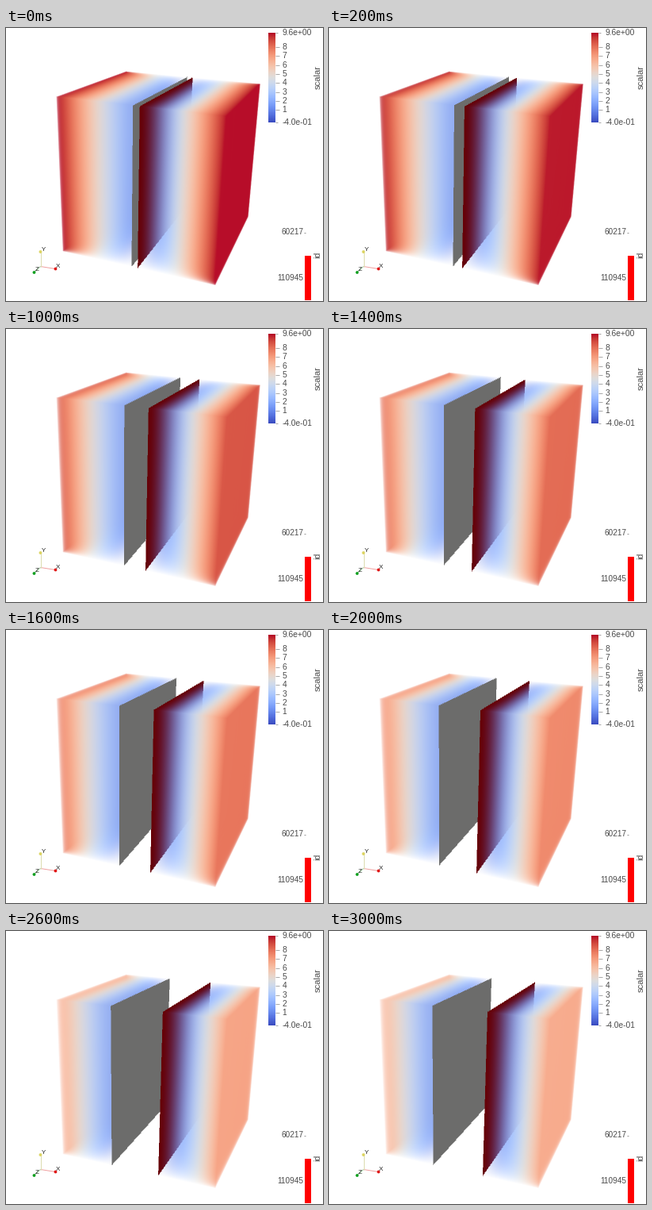
Animation of 400 by 344 pixels, one loop 3200 ms. Source, as a matplotlib script:

```python
import numpy as np
import matplotlib.pyplot as plt
from matplotlib.animation import FuncAnimation

W, H, DPI = 400, 344, 100
FRAMES, INTERVAL = 16, 200
STEPS = 36          # samples along each ray
LUT = 8192          # resolution of the lookup tables across the cube
UNIT = 0.068        # opacity unit distance
MID = 0.497         # where the cube is split
GREY, MAROON = (0.425, 0.425, 0.42), (0.4, 0.0, 0.02)
INK = "#4a4a4a"
CMAP = plt.get_cmap("coolwarm")

# cube corners: u right, v up, w away from the viewer -> screen x, y
CORNERS = [
    (0, 1, 0, 63, 86), (1, 1, 0, 278, 110.5), (1, 0, 0, 264, 324),
    (0, 0, 0, 71, 281), (0, 1, 1, 151, 54), (1, 1, 1, 321, 70),
    (1, 0, 1, 305, 237), (0, 0, 1, 150.5, 210),
]


def fit_camera():
    """Least-squares projection matrix through the cube corners."""
    rows, rhs = [], []
    for u, v, w, x, y in CORNERS:
        rows.append([u, v, w, 1, 0, 0, 0, 0, -x * u, -x * v, -x * w])
        rows.append([0, 0, 0, 0, u, v, w, 1, -y * u, -y * v, -y * w])
        rhs += [x, y]
    p = np.linalg.lstsq(np.array(rows, float), np.array(rhs, float), rcond=None)[0]
    p = np.append(p, 1).reshape(3, 4)
    inv = np.linalg.inv(p[:, :3])
    return inv, -inv @ p[:, 3]


def cast_rays(shift):
    """Where each pixel's ray enters and leaves the cube, and its speed in u."""
    inv, eye = fit_camera()
    y, x = np.mgrid[0:H, 0:W] + shift
    d = np.stack([x, y, np.ones_like(x)], -1).reshape(-1, 3) @ inv.T
    near, far = -eye / d, (1 - eye) / d
    t0 = np.minimum(near, far).max(1)
    t1 = np.maximum(near, far).min(1)
    hit = np.flatnonzero(t1 > t0)
    d, t0, t1 = d[hit], t0[hit], t1[hit]
    speed = np.abs(d[:, 0]) / np.linalg.norm(d, axis=1)
    u_in = np.clip(eye[0] + t0 * d[:, 0], 0, 1)
    u_out = np.clip(eye[0] + t1 * d[:, 0], 0, 1)
    return hit, u_in, u_out, speed


def half_gap(i):
    return min(0.02 + 0.0102 * i, 0.162)


def trace(rays, h):
    hit, u_in, u_out, speed = rays
    u = np.linspace(0, 1, LUT + 1)
    s = 20 * (np.abs(u - MID) - h)
    level = np.clip((s + 0.4) / 10, 0, 0.99)
    density = np.where(s >= 0, -np.log1p(-level), 0) / UNIT
    depth = np.cumsum(density) / LUT
    rgb = CMAP(level)[:, :3]

    left, right = MID - h, MID + h
    on_red = (u_in > right) & (u_out < right)
    on_grey = (u_in <= right) & (u_in > left) & (u_out < left)
    stop = np.where(on_red, right, np.where(on_grey, left, u_out))
    base = np.ones((len(hit), 3))
    base[on_red], base[on_grey] = MAROON, GREY

    prev = np.rint(u_in * LUT).astype(int)
    start, span = depth[prev], stop - u_in
    light = np.ones(len(hit))
    color = np.zeros_like(base)
    for k in range(1, STEPS + 1):
        cur = np.rint((u_in + span * (k / STEPS) ** 2) * LUT).astype(int)
        rest = np.exp((depth[cur] - start) / speed)
        color += (light - rest)[:, None] * rgb[(prev + cur) // 2]
        prev, light = cur, rest
    color += light[:, None] * base

    img = np.ones((H * W, 3))
    img[hit] = color
    return img.reshape(H, W, 3)


RAYS = [cast_rays(shift) for shift in (-0.25, 0.25)]


def render(i):
    img = sum(trace(r, half_gap(i)) for r in RAYS) / len(RAYS)
    return (np.clip(img, 0, 1) * 255).round().astype(np.uint8)


fig = plt.figure(figsize=(W / DPI, H / DPI), dpi=DPI, facecolor="white")
ax = fig.add_axes([0, 0, 1, 1])
ax.axis("off")


def px(n):
    return n * 72 / DPI


def label(x, y, text, size=10, **kw):
    kw = {"ha": "left", "va": "center", "color": INK, **kw}
    ax.text(x, y, text, fontsize=px(size), family="Liberation Sans", **kw)


def line(xs, ys, color, width=1):
    ax.plot(xs, ys, color=color, lw=px(width), solid_capstyle="butt")


def scalar_bar():
    top, bottom = 6, 119
    ramp = np.linspace(1, 0, 256)[:, None]
    ax.imshow(ramp, cmap=CMAP, extent=(331, 340, bottom, top), aspect="auto", zorder=2)
    for value in [9.6, *range(8, 0, -1), -0.4]:
        y = bottom - (value + 0.4) / 10 * (bottom - top)
        whole = isinstance(value, int)
        line([340, 345 if whole else 343], [y, y], "#aaaaaa")
        label(348.5, y, str(value) if whole else f"{value:.1e}", 10.2)
    label(393.5, 62, "scalar", 11.3, ha="center", rotation=90)


def id_bar():
    ax.add_patch(plt.Rectangle((377, 287), 8, 56, color="#ff0000", lw=0))
    label(375.5, 314.5, "110945", ha="right")
    label(375, 257.5, "60217", ha="right")
    line([375.5, 378], [258, 258], "#999999")
    label(393, 286, "id", 10.5, ha="center", rotation=90)


def axes_marker():
    origin = (43.5, 300.5)
    tips = [("X", 62.5, 303.5, "#e01010", "#f0a0a0", 65.5, 301),
            ("Y", 43.5, 282, "#dcd460", "#dcdcb0", 47, 279.5),
            ("Z", 35.5, 308, "#10a020", "#a0cca0", 39, 305)]
    for name, x, y, tip, shaft, tx, ty in tips:
        line([origin[0], x], [origin[1], y], shaft)
        ax.add_patch(plt.Circle((x, y), 1.9, color=tip, lw=0, zorder=3))
        label(tx, ty, name, 8, ha="center", color="#222222", zorder=4)


frames = [render(i) for i in range(FRAMES)]
view = ax.imshow(frames[0], extent=(0, W, H, 0), interpolation="nearest", zorder=0)
scalar_bar()
id_bar()
axes_marker()
ax.set_aspect("auto")
ax.set_xlim(0, W)
ax.set_ylim(H, 0)


def update(i):
    view.set_data(frames[i])
    return [view]


anim = FuncAnimation(fig, update, frames=FRAMES, interval=INTERVAL,
                     repeat=True, repeat_delay=0)
plt.show()
```
